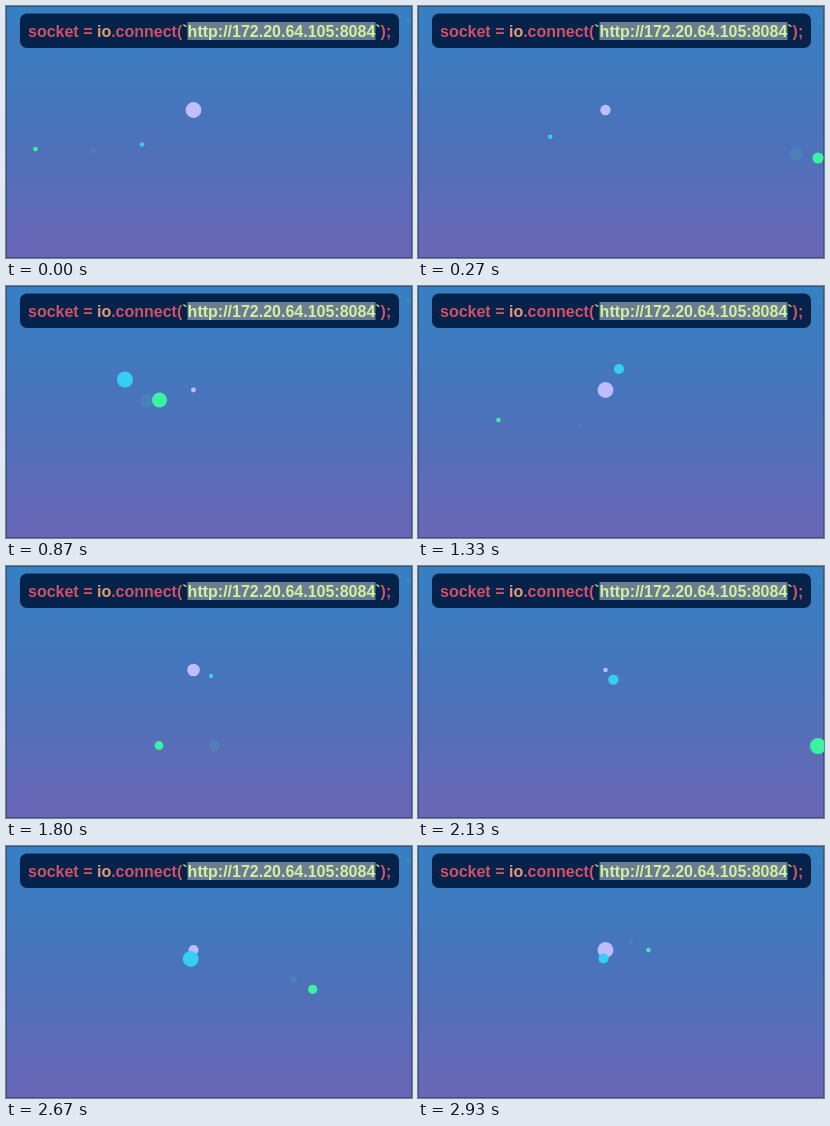
An HTML page that plays this animation: 406x252 px, repeating every 3000 ms.

```html
<!DOCTYPE html>
<html lang="en">
<head>
<meta charset="utf-8">
<title>Socket cursors</title>
<style>
  html, body { margin: 0; width: 100%; height: 100%; overflow: hidden; }
  svg { display: block; width: 100%; height: 100%; }
  text { font: bold 16px "Liberation Sans", Helvetica, Arial, sans-serif; fill: #ce5268; white-space: pre; }
</style>
</head>
<body>
<svg viewBox="0 0 406 252">
  <defs>
    <linearGradient id="sky" x1="0" y1="0" x2="0" y2="1">
      <stop offset="0" stop-color="#3680c3"/>
      <stop offset=".5" stop-color="#4a73bb"/>
      <stop offset="1" stop-color="#6c66b7"/>
    </linearGradient>
  </defs>
  <rect width="406" height="252" fill="url(#sky)"/>
  <rect x=".5" y=".5" width="405" height="251" fill="none" stroke="#2b4a78" stroke-opacity=".7"/>
  <circle cx="402.5" cy="15" r="2.5" fill="#2f9c9c" opacity=".5"/>
  <rect x="14" y="7.5" width="379" height="34.5" rx="7" fill="#04224a"/>
  <rect x="181.5" y="16" width="188" height="18" fill="#6c7d90"/>
  <text x="22" y="30.5">socket = <tspan fill="#e39c70">io</tspan>.connect(<tspan fill="#b9dc94">`</tspan><tspan fill="#d0f0a2">http://172.20.64.105:8084</tspan><tspan fill="#b9dc94">`</tspan>);</text>
  <circle id="lilac" fill="#c0bdfd"/>
  <circle id="ghost" fill="#3bf2a0" opacity=".12"/>
  <circle id="green" fill="#3bf2a0"/>
  <circle id="cyan" fill="#35cff6"/>
</svg>
<script>
const LOOP = 3000, FPS = 15, PULSE = 1600;

// Turning points of each cursor: [step, x, y]
const greenPath = [
  [0, 29.5, 143], [4, 400, 152], [8, 228, 120], [13, 153.5, 114], [20, 80.5, 134],
  [23, 396, 156], [26, 119, 178], [27, 153, 179.5], [32, 400, 180], [36, 375, 177],
  [44, 230.5, 104]
];
const cyanPath = [
  [0, 136, 138.5], [13, 119, 93.5], [20, 201, 83], [27, 205, 110],
  [36, 186, 113], [44, 185.5, 112.5]
];
const lilacPath = [[0, 187.5, 104], [44, 187.5, 104]];

// Starts from rest, and is flat wherever the direction reverses
function slope(path, i, axis) {
  const before = path[i - 1], here = path[i], after = path[i + 1] || here;
  if (!before) return 0;
  const reverses = (here[axis] - before[axis]) * (after[axis] - here[axis]) < 0;
  return reverses ? 0 : (after[axis] - before[axis]) / (after[0] - before[0]);
}

// Cubic Hermite curve through the points
function along(path, step) {
  let i = 0;
  while (i < path.length - 2 && path[i + 1][0] <= step) i++;
  const a = path[i], b = path[i + 1];
  const span = b[0] - a[0], u = (step - a[0]) / span;
  const ease = u * u * (3 - 2 * u);
  return [1, 2].map(axis =>
    a[axis] + (b[axis] - a[axis]) * ease +
    span * u * (1 - u) * (slope(path, i, axis) * (1 - u) - slope(path, i + 1, axis) * u));
}

function radius(step, peak) {
  const wave = Math.cos(2 * Math.PI * (step * 1000 / FPS - peak) / PULSE);
  return 5.1 + 2.9 * Math.sin(wave * Math.PI / 2);
}

function place(id, path, step, peak) {
  const dot = document.getElementById(id);
  const [x, y] = along(path, step);
  dot.setAttribute("cx", x);
  dot.setAttribute("cy", y);
  dot.setAttribute("r", radius(step, peak));
}

function draw(time) {
  // Steps land on times rounded to 10 ms, hence the small lead
  const step = Math.floor(((time + 4) % LOOP) * FPS / 1000);
  place("lilac", lilacPath, step, -130);
  place("ghost", greenPath, step + 1, 640);
  place("green", greenPath, step, 640);
  place("cyan", cyanPath, step, 930);
}

let start;
function tick(now) {
  start ??= now;
  draw(now - start);
  requestAnimationFrame(tick);
}
draw(0);
requestAnimationFrame(tick);
</script>
</body>
</html>
```
